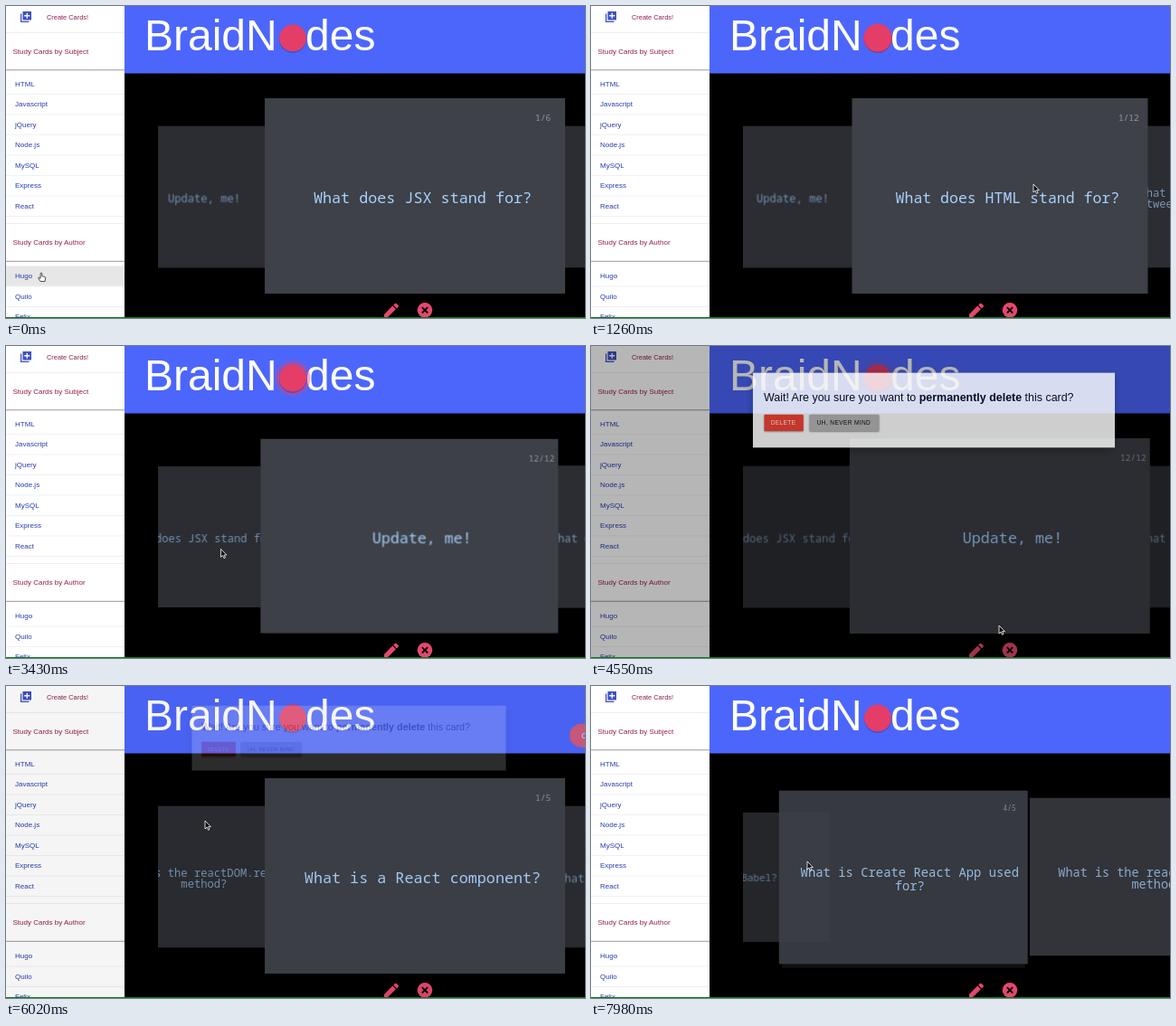
Write an HTML page that moves like this. It is 640 px wide and 345 px high and loops after 8 s.

```html
<!DOCTYPE html>
<html lang="en">
<head>
<meta charset="utf-8">
<title>Study cards</title>
<style>
  html, body { margin: 0; width: 100%; height: 100%; overflow: hidden; background: #000; }
  #stage { position: relative; width: 640px; height: 345px; overflow: hidden;
    font-family: "Liberation Sans", Arial, sans-serif; }
  #stage > * { position: absolute; }
  svg { left: 0; top: 0; display: block; overflow: visible; }
  #deck { left: 168px; top: 102px; width: 472px; height: 216px; overflow: hidden; isolation: isolate; }
  .card { position: absolute; left: 118px; top: 0; width: 332px; height: 216px; background: #3e4148;
    font-family: "Noto Sans Mono", "DejaVu Sans Mono", monospace; }
  .card.mid { box-shadow: 0 9px 0 -4px #131314; }
  .count { position: absolute; left: 299px; top: 14px; font-size: 9.6px; line-height: 16px; color: #92969d; }
  .ask { position: absolute; left: -60px; right: -60px; top: 110px; transform: translateY(-50%);
    text-align: center; white-space: pre; font-size: 16.75px; line-height: 16.5px; color: #a9d2ff; }
  #shade { inset: 0; background: #000; }
  #modal { left: 170.5px; top: 31.5px; width: 416px; height: 86px; background: #fff;
    box-shadow: 0 4px 10px rgba(0, 0, 0, .35); }
  #modal p { position: absolute; margin: 0; left: 12.5px; top: 18.5px; line-height: 20px;
    font-size: 12.95px; white-space: nowrap; color: #000; }
  .btn { position: absolute; top: 48px; height: 19px; line-height: 19px; border-radius: 1px; text-align: center;
    font-size: 6.8px; letter-spacing: .4px; box-shadow: 0 1px 2px rgba(0, 0, 0, .4); }
  #yes { left: 12.5px; width: 45px; background: #f44336; color: #fff; }
  #no { left: 64.5px; width: 80px; background: #b8b8b8; color: #111; }
  #toast { left: 623px; top: 37px; width: 110px; height: 26px; line-height: 26px; border-radius: 13px;
    padding-left: 13px; box-sizing: border-box; background: #ee5350; color: #fff; font-size: 9px; }
  #edge { left: 0; top: 343.7px; width: 640px; height: 1.3px; background: #087a14; }
</style>
</head>
<body>
<div id="stage">
  <svg id="page" width="640" height="345" viewBox="0 0 640 345">
    <rect x="131" width="509" height="74.5" fill="#4c66fc"/>
    <g fill="#fff" font-size="48">
      <text x="153" y="49">BraidN</text>
      <text x="331" y="49">des</text>
    </g>
    <circle id="pulse" cx="317" cy="35.5" r="15" fill="#e43d68"/>
    <circle cx="317" cy="36.7" r="15.2" fill="#000" opacity=".18"/>
    <circle cx="317" cy="35.5" r="15" fill="#e43d68"/>
    <rect width="131" height="345" fill="#fff"/>
    <g id="rows" font-size="8"></g>
    <g fill="#3d4fc4">
      <path d="M16 8.5h1.3v8.2h8.2V18H16z"/>
      <path fill-rule="evenodd" d="M18.5 6H28v9.5h-9.5zM22.6 7.7v2.4h-2.4v1.3h2.4v2.4h1.3v-2.4h2.4v-1.3h-2.4V7.7z"/>
    </g>
    <text x="45" y="14.8" font-size="7.4" fill="#8c1f52">Create Cards!</text>
    <g font-size="8" fill="#96203f">
      <text x="7.5" y="52.6">Study Cards by Subject</text>
      <text x="7.5" y="264.4">Study Cards by Author</text>
    </g>
    <path d="M0 70.8H131M0 282.3H131" stroke="#999"/>
    <path d="M0 29.5H131M0 240.5H131" stroke="#efefef"/>
    <g fill="#e6476f">
      <path d="M418 344.5v-3.6l9.3-9.3 3.6 3.6-9.3 9.3zM428.2 330.7l1.7-1.7q.8-.7 1.6 0l2.1 2.1q.7.8 0 1.6l-1.7 1.7z"/>
      <circle cx="463" cy="336.3" r="8.3"/>
    </g>
    <path d="M459.8 333.1l6.4 6.4m0-6.4l-6.4 6.4" stroke="#000" stroke-width="1.9"/>
  </svg>
  <div id="deck"></div>
  <div id="shade"></div>
  <div id="modal">
    <p>Wait! Are you sure you want to <b>permanently delete</b> this card?</p>
    <div class="btn" id="yes">DELETE</div>
    <div class="btn" id="no">UH, NEVER MIND</div>
  </div>
  <div id="toast">Card deleted!</div>
  <div id="edge"></div>
  <svg id="cursor" width="12" height="12" viewBox="0 0 12 12">
    <path id="arrow" d="M0 0v9l2.1-1.9 1.4 3.2 1.5-.7-1.4-3h2.8z" fill="#111" stroke="#fff" stroke-width=".8"/>
    <path id="hand" d="M-.9.6q.9-1 1.7 0v3.2l3.2.7q.8.3.7 1.3l-.7 3.8H-.8L-3.4 6q.2-1.200 1.4-.5l1.1.8z"
      fill="#fff" stroke="#222" stroke-width=".8"/>
  </svg>
</div>
<script>
const LOOP = 8000, STEP = 70;
const SWAP_1 = 350, SWAP_2 = 5880;          // a new deck is loaded
const PICK_1 = 2146, PICK_2 = 6876, PICK_3 = 7632; // clicks on the left card
const OPEN = 4444, CLOSE = 5909, FADE = 250; // dialog
const TOAST_OUT = 7450;
const TAU = 325;                             // carousel settling time

const JSX = "What does JSX stand for?", BABEL = "What is Babel?", UPDATE = "Update, me!";
const COMPONENT = "What is a React component?";
const CREATE = "What is Create React App used\nfor?";
const RENDER = "What is the reactDOM.render\nmethod?";
const DECKS = [
  [JSX, BABEL, CREATE, RENDER, COMPONENT, UPDATE],
  ["What does HTML stand for?", "What is a main difference\nbetween one id and a class?",
    BABEL, CREATE, RENDER, COMPONENT, BABEL, CREATE, RENDER, COMPONENT, JSX, UPDATE],
  [COMPONENT, JSX, BABEL, CREATE, RENDER],
];

// time and pointer tip
const PATH = [
  [0, 39, 295], [880, 39, 295], [1220, 489, 197], [1500, 489, 197], [2080, 224, 218], [3300, 224, 218],
  [4200, 462, 332], [4450, 462, 332], [4550, 451, 309], [4700, 451, 309], [5110, 212, 82],
  [5750, 212, 82], [6020, 220, 149], [6650, 239, 194], [LOOP, 239, 194],
];

const $ = id => document.getElementById(id);
const clamp = v => Math.min(1, Math.max(0, v));
const span = (t, from, length) => clamp((t - from) / length);
const out = (p, power) => 1 - (1 - p) ** power;
const smooth = p => p * p * (3 - 2 * p);

function addSvg(parent, tag, attrs, text = "") {
  const el = document.createElementNS("http://www.w3.org/2000/svg", tag);
  for (const key in attrs) el.setAttribute(key, attrs[key]);
  el.textContent = text;
  return parent.appendChild(el);
}

function makeRows(labels, firstY) {
  return labels.map((label, i) => {
    const y = firstY + i * 22.5;
    const back = addSvg($("rows"), "rect", { x: 0, y: y - 11, width: 131, height: 22.5, fill: "#e7e7e7" });
    addSvg($("rows"), "path", { d: `M0 ${y + 11.5}H131`, stroke: "#f1f1f1" });
    addSvg($("rows"), "text", { x: 10, y: y + 2.8, fill: "#2a3bb4" }, label);
    return { y, back };
  });
}
const rows = [
  ...makeRows(["HTML", "Javascript", "jQuery", "Node.js", "MySQL", "Express", "React"], 86),
  ...makeRows(["Hugo", "Quilo", "Felix"], 298.5),
];

const cards = [-2, -1, 0, 1, 2].map(slot => {
  const el = $("deck").appendChild(document.createElement("div"));
  el.className = slot ? "card" : "card mid";
  el.style.zIndex = 3 - Math.abs(slot);
  const [count, ask] = ["count", "ask"].map(name => {
    const part = el.appendChild(document.createElement("div"));
    part.className = name;
    return part;
  });
  return { slot, el, count, ask };
});

function position(t) {
  const settle = from => Math.exp(-(t - from) / TAU);
  if (t < PICK_1) return 0;
  if (t < SWAP_2) return -1 + settle(PICK_1);
  if (t < PICK_2) return 0;
  if (t < PICK_3) return -1 + settle(PICK_2);
  return -2 + 1.09 * settle(PICK_3);
}

function drawDeck(t) {
  const which = t < SWAP_1 ? 0 : t < SWAP_2 ? 1 : 2;
  const deck = DECKS[which], size = deck.length;
  const pos = position(t), mid = Math.round(pos);
  const squeeze = 1 - .015 * smooth(clamp(1 - Math.abs(t - 1260) / 240));
  for (const { slot, el, count, ask } of cards) {
    const d = mid + slot - pos, far = Math.abs(d);
    const index = ((mid + slot) % size + size) % size;
    const sy = 1 / (1 + (slot ? .379 : .34) * far);
    const sx = slot ? sy : (1 - .46 * far) * squeeze;
    const x = (slot ? 330 : 322) * d * sy;
    const y = slot ? 1 : 4 * far;
    el.style.transform = `translate(${x}px, ${y}px) scale(${sx}, ${sy})`;
    el.style.opacity = far > 1.9 ? 0 : 1 - .3 * far;
    count.textContent = `${index + 1}/${size}`;
    ask.textContent = deck[index];
    ask.style.marginLeft = (deck[index] === UPDATE && which ? 28 : 17) + "px";
  }
}

function drawDialog(t) {
  const closing = t >= CLOSE;
  const p = span(t, closing ? CLOSE : OPEN, FADE);
  const shown = closing ? 1 - out(p, 3) : out(p, 3);
  $("shade").style.opacity = .43 * (closing ? 1 - out(p, 4) : out(p, 2));
  $("modal").style.opacity = shown;
  $("modal").style.transform = `translateY(${-21 * (1 - shown)}px) scale(${.8 + .2 * shown})`;
}

function drawToast(t) {
  const rise = out(span(t, CLOSE, 300), 3), leave = out(span(t, TOAST_OUT, 375), 3);
  $("toast").style.opacity = rise * (1 - leave);
  $("toast").style.transform = `translateY(${19 * (1 - rise) - 22 * leave}px)`;
}

function drawPulse(t) {
  const p = smooth(clamp(((t + 850) % 1000) / 500));
  $("pulse").setAttribute("r", 15 * (1 + .5 * p));
  $("pulse").setAttribute("opacity", 1 - p);
}

function drawCursor(t) {
  const i = PATH.findIndex(stop => stop[0] > t);
  const [t0, x0, y0] = PATH[i - 1], [t1, x1, y1] = PATH[i];
  const p = smooth(span(t, t0, t1 - t0));
  const x = x0 + (x1 - x0) * p, y = y0 + (y1 - y0) * p;
  const modal = t > OPEN && t < CLOSE;
  const onRows = x < 131 && !modal;
  const onDelete = !modal && Math.hypot(x - 463, y - 336) < 9;
  const onYes = modal && x > 190 && x < 236 && y > 75 && y < 95;
  const hand = onRows || onDelete || onYes;
  $("hand").style.display = hand ? "" : "none";
  $("arrow").style.display = hand ? "none" : "";
  $("cursor").style.transform = `translate(${x}px, ${y}px)`;
  for (const row of rows)
    row.back.style.display = onRows && Math.abs(y + .5 - row.y) < 11 ? "" : "none";
}

const start = performance.now();
function frame(now) {
  const t = Math.floor(Math.max(0, now - start) % LOOP / STEP) * STEP;
  drawDeck(t);
  drawDialog(t);
  drawToast(t);
  drawPulse(t);
  drawCursor(t);
  requestAnimationFrame(frame);
}
frame(start);
</script>
</body>
</html>
```
